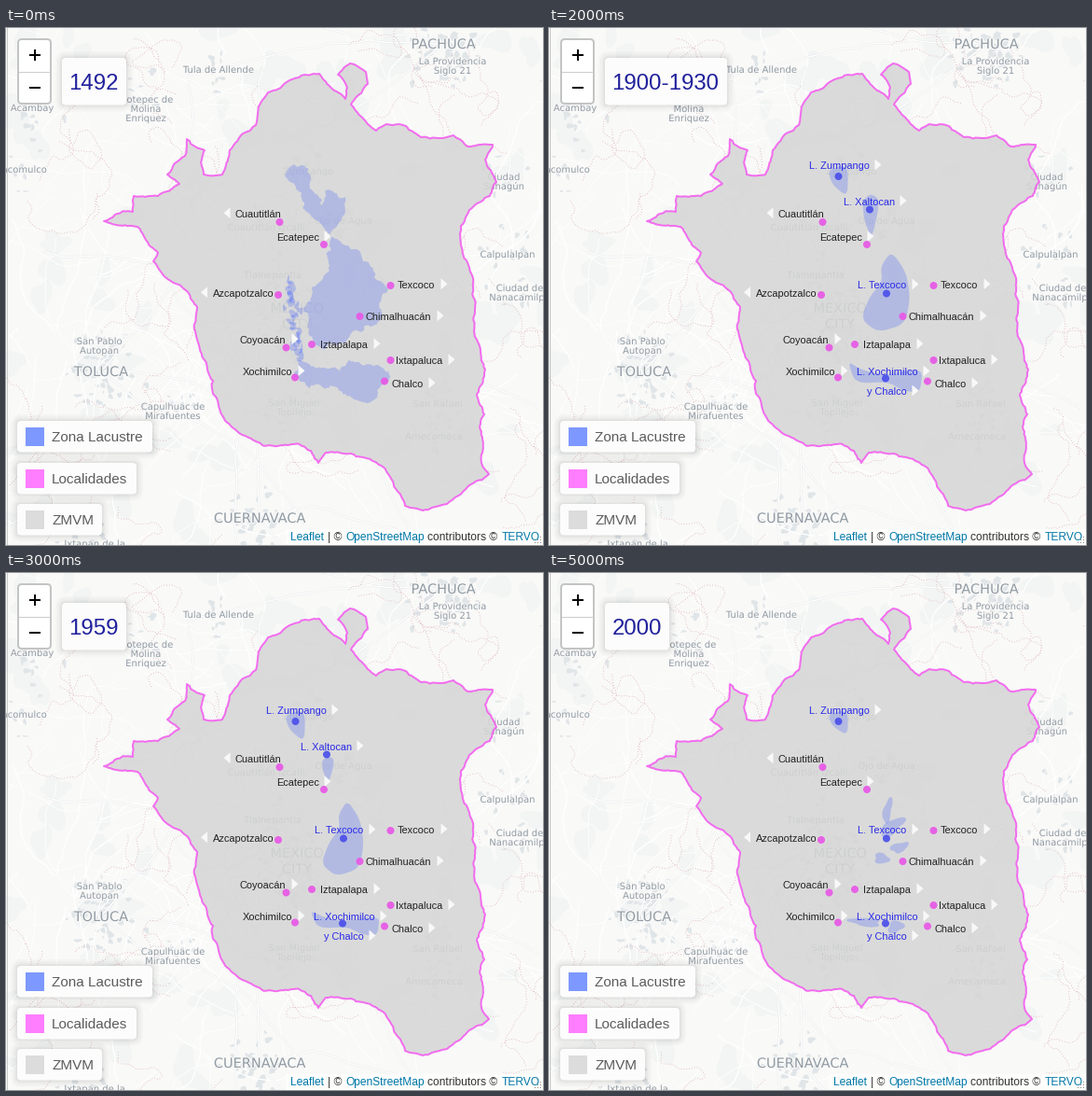
A matplotlib script that plays this animation: 576x554 px, repeating every 6000 ms.

```python
import math
import numpy as np
import matplotlib.pyplot as plt
from matplotlib.animation import FuncAnimation
from matplotlib.patches import Circle, FancyBboxPatch, Polygon, Rectangle
from matplotlib.patheffects import withStroke

W, H = 576, 554
SANS, MAP_FONT = "Liberation Sans", "DejaVu Sans"
PAPER = "#f9f9f8"
rng = np.random.default_rng(1521)

# dpi 72 makes one point equal one pixel
fig = plt.figure(figsize=(W / 72, H / 72), dpi=72, facecolor=PAPER)
ax = fig.add_axes([0, 0, 1, 1])
ax.set(xlim=(0, W), ylim=(H, 0))
ax.axis("off")


def text(x, y, s, size, color, z=8, font=SANS, **kw):
    return ax.text(x, y, s, fontsize=size, color=color, family=font,
                   va="baseline", zorder=z, **kw)


def shape(pts, color, z, alpha=1):
    return ax.add_patch(Polygon(pts, fc=color, ec="none", alpha=alpha, zorder=z))


def box(x0, y0, x1, y1, r=4, **kw):
    return ax.add_patch(FancyBboxPatch(
        (x0, y0), x1 - x0, y1 - y0,
        boxstyle=f"round,pad=0,rounding_size={r}", **kw))


def panel(x0, y0, x1, y1):
    """White card with a soft shadow."""
    parts = [box(x0 - g, y0 - g, x1 + g, y1 + g, 4 + g, fc="black", ec="none",
                 alpha=0.018, zorder=10) for g in (1, 2, 3, 5, 7)]
    parts.append(box(x0, y0, x1, y1, fc="#fcfcfc", ec="none", zorder=11))
    return parts


def fractal(pts, amp, step=4):
    """Closed outline roughened by repeated midpoint displacement."""
    def split(a, b):
        d = math.dist(a, b)
        if d < step:
            return [a]
        mid = (a + b) / 2 + rng.normal(0, amp * d, 2)
        return split(a, mid) + split(mid, b)

    p = np.array(pts, float)
    return np.array([q for a, b in zip(p, np.roll(p, -1, axis=0)) for q in split(a, b)])


def smooth(pts):
    """Closed outline with its corners cut three times."""
    p = np.array(pts, float)
    for _ in range(3):
        q = np.roll(p, -1, axis=0)
        p = np.stack([0.8 * p + 0.2 * q, 0.2 * p + 0.8 * q], 1).reshape(-1, 2)
    return p


def blob(x, y, rx, ry, tilt=0, wobble=0.18):
    t = np.linspace(0, 2 * np.pi, 24, endpoint=False)
    r = 1 + wobble * (np.sin(2 * t + rng.uniform(0, 6)) + np.sin(3 * t + rng.uniform(0, 6)))
    u, v = rx * r * np.cos(t), ry * r * np.sin(t)
    c, s = math.cos(tilt), math.sin(tilt)
    return np.c_[x + c * u - s * v, y + s * u + c * v]


def shrink(pts, anchor, sx, sy):
    return np.array(anchor) + (np.array(pts) - anchor) * (sx, sy)


def wander(x, y, n, step, turn):
    heading = rng.uniform(0, 2 * np.pi) + np.cumsum(rng.normal(0, turn, n))
    return x + np.cumsum(step * np.cos(heading)), y + np.cumsum(step * np.sin(heading))


def somewhere():
    return rng.uniform(0, W), rng.uniform(0, H)


# Base map: hills, towns, roads and dotted borders
cities = [(469, 22, "PACHUCA"), (102, 373, "TOLUCA"), (272, 530, "CUERNAVACA"),
          (312, 305, "MEXICO"), (312, 322, "CITY")]
towns = [(228, 48, "Tula de Allende"), (479, 39, "La Providencia\nSiglo 21"),
         (28, 89, "Acambay"), (150, 80, "Jilotepec de\nMolina\nEnriquez"),
         (13, 155, "Atlacomulco"), (534, 163, "Ciudad\nSahagún"),
         (538, 246, "Calpulalpan"), (551, 282, "Ciudad de\nNanacamilpa"),
         (100, 339, "San Pablo\nAutopan"), (179, 409, "Capulhuac de\nMirafuentes"),
         (95, 556, "Ixtapan de la"), (324, 157, "Zumpango"),
         (279, 217, "Cuautitlán Izcalli"), (362, 210, "Ojo de Agua"),
         (286, 268, "Tlalnepantla"), (309, 405, "San Miguel\nTopilejo"),
         (463, 406, "San Rafael"), (459, 441, "Amecameca")]

for _ in range(80):
    shape(blob(*somewhere(), *rng.uniform(6, 20, 2)), "#f2f5f4", 1)

for places, spread, count in [(cities, 18, 45), (towns, 14, 12)]:
    for x, y, _ in places:
        for _ in range(count):
            shape(blob(*rng.normal((x, y), spread), *rng.uniform(0.8, 4, 2)), "#e0e5e8", 1)

for _ in range(130):
    ax.plot(*wander(*somewhere(), 35, 4, 0.16), color="white",
            lw=rng.uniform(0.6, 1.5), zorder=1.2)
for x, y, _ in cities:
    for _ in range(3):
        road = wander(x, y - 5, 70, 4, 0.07)
        ax.plot(*road, color="#e6e8e9", lw=2.2, zorder=1.3)
        ax.plot(*road, color="white", lw=1.4, zorder=1.4)
for _ in range(75):
    ax.plot(*wander(*somewhere(), 45, 3, 0.4), color="#e2b9bb", lw=0.9,
            ls=(0, (1, 2.2)), zorder=1.5)

halo = [withStroke(linewidth=2, foreground=PAPER)]
for places, size in [(cities, 14.5), (towns, 10)]:
    for x, y, s in places:
        for k, line in enumerate(s.split("\n")):
            text(x, y + 10 * k, line, size, "#919ba4", 2, MAP_FONT, ha="center",
                 path_effects=halo)

# Metropolitan area, clockwise from its northern tip
border = [(369, 38), (386, 47), (388, 60), (370, 82), (388, 103), (397, 110), (408, 103),
          (432, 109), (445, 117), (467, 118), (480, 115), (496, 127), (522, 125),
          (514, 141), (526, 165), (519, 180), (497, 195), (488, 212), (488, 233),
          (501, 268), (502, 325), (514, 366), (505, 394), (513, 414), (510, 466),
          (518, 478), (497, 490), (465, 512), (447, 517), (428, 512), (404, 470),
          (370, 456), (343, 455), (335, 466), (275, 447), (250, 434), (222, 392),
          (203, 325), (205, 299), (185, 275), (158, 250), (163, 241), (141, 213),
          (105, 207), (136, 197), (137, 180), (163, 180), (186, 167), (173, 157),
          (192, 137), (194, 119), (213, 131), (212, 157), (232, 157), (240, 131),
          (268, 104), (281, 69), (336, 49), (352, 67), (364, 76), (366, 64), (356, 50)]
area = fractal(border, 0.06)
shape(area, "#d6d6d6", 3, 0.88)
ax.add_patch(Polygon(area, fc="none", ec="#f45cf0", lw=2, alpha=0.88,
                     joinstyle="round", zorder=5))

# Lakes: one rough body first, then separate lakes that shrink
ancient = [
    [(309, 146), (324, 150), (326, 172), (338, 190), (343, 174), (364, 181), (364, 196),
     (348, 222), (333, 206), (316, 180), (299, 158)],
    [(347, 222), (362, 232), (378, 238), (383, 250), (398, 270), (402, 312), (384, 320),
     (364, 338), (344, 343), (326, 330), (318, 300), (328, 278), (347, 260)],
    [(315, 355), (342, 364), (368, 356), (399, 361), (411, 378), (398, 396), (380, 400),
     (352, 384), (325, 386), (308, 374)]]
marsh = [blob(rng.normal(302 + 15 * t, 4), 270 + 85 * t, *rng.uniform(1.5, 5, 2))
         for t in np.linspace(0, 1, 32)]

zumpango = [(299, 153), (315, 147), (321, 153), (320, 181), (304, 168)]
xaltocan = [(330, 178), (343, 169), (358, 174), (358, 190), (346, 227), (332, 200)]
texcoco = [(368, 225), (386, 252), (391, 285), (385, 319), (352, 330), (331, 313),
           (341, 285), (357, 264), (355, 245)]
chalco = [(316, 353), (332, 364), (358, 371), (401, 361), (398, 393), (378, 390),
          (362, 379), (325, 381)]


def lakes(x_scale, t_scale, c_scale):
    return [smooth(p) for p in (zumpango, shrink(xaltocan, (346, 224), *x_scale),
                                shrink(texcoco, (361, 308), *t_scale),
                                shrink(chalco, (401, 380), *c_scale))]


remnants = [smooth(shrink(zumpango, (309, 148), 1, 0.8))] + [
    blob(*b) for b in [(363, 255, 5, 12, 0.15), (368, 272, 14, 7, -0.5),
                       (376, 294, 10, 5, -0.5), (357, 306, 9, 5, 0),
                       (339, 374, 19, 4, 0.05), (372, 379, 9, 6, 0)]]
periods = [("1492", [fractal(p, 0.13, 3) for p in ancient] + marsh),
           ("1824", lakes((1, 1), (1, 1), (1, 1))),
           ("1900-1930", lakes((0.6, 0.84), (0.88, 0.83), (0.95, 0.85))),
           ("1959", lakes((0.45, 0.5), (0.76, 0.78), (0.88, 0.7))),
           ("1980", remnants), ("2000", remnants)]


def marker(x, y, color):
    return ax.add_patch(Circle((x, y), 4, fc=color, ec="none", alpha=0.92, zorder=7))


def arrow(x, y, side=1):
    return shape([(x - 3.5 * side, y - 6), (x + 3.5 * side, y), (x - 3.5 * side, y + 6)],
                 "#f8f8f8", 6)


# name, text x, text middle y, dot, arrow x, arrow direction
for s, x, y, dot, tip, side in [
        ("Cuautitlán", 246, 199, (293.5, 208), 237, -1),
        ("Ecatepec", 290, 224, (341, 232), 345, 1),
        ("Azcapotzalco", 222, 284, (292, 286), 212.5, -1),
        ("Texcoco", 420, 275, (412.5, 276), 470, 1),
        ("Chimalhuacán", 386, 309, (379.5, 309), 466, 1),
        ("Coyoacán", 250.5, 334, (300.5, 342.5), 310, 1),
        ("Iztapalapa", 337.5, 339, (328, 339), 398, 1),
        ("Ixtapaluca", 418, 356, (412.5, 356), 478, 1),
        ("Xochimilco", 254, 368, (310, 374.5), 317, 1),
        ("Chalco", 413.5, 381, (406, 378.5), 457, 1)]:
    arrow(tip, y - 0.8, side)
    marker(*dot, "#e858e6")
    text(x, y + 4, s, 11, "#222222")


def lake_label(dot, *lines):
    parts = [marker(*dot, "#4b50ea")]
    for s, x, y, tip in lines:
        parts += [arrow(tip, y - 0.5), text(x, y + 4, s, 11, "#2a2ae8")]
    return parts


names = (lake_label((310.5, 159), ("L. Zumpango", 279, 147, 353))
         + lake_label((362, 284.5), ("L. Texcoco", 331, 275, 393))
         + lake_label((361, 375.5), ("L. Xochimilco", 330, 368, 405),
                      ("y Chalco", 341, 389, 393)))
xaltocan_name = lake_label((344, 194.5), ("L. Xaltocan", 315.5, 185.5, 380))

# Controls, legend and credits
box(13, 12, 48, 81, fc="white", ec="#c3c4c4", lw=2, zorder=12)
ax.plot([14, 47], [46.5, 46.5], color="#cccccc", lw=1, zorder=13)
for xs, ys in [((25, 37), (29, 29)), ((31, 31), (23, 35)), ((25, 37), (64, 64))]:
    ax.plot(xs, ys, color="black", lw=2, zorder=13, solid_capstyle="butt")

for s, top, right, color in [("Zona Lacustre", 421, 157, "#7d98ff"),
                             ("Localidades", 466, 140, "#ff7dff"),
                             ("ZMVM", 510, 103, "#dcdcdc")]:
    panel(12, top, right, top + 33.5)
    ax.add_patch(Rectangle((21, top + 6.5), 20, 20, fc=color, ec="none", zorder=12))
    text(49, top + 22, s, 15.3, "#5c5c5c", 12)

ax.add_patch(Rectangle((300, 537), 276, 17, fc="white", ec="none", alpha=0.7, zorder=10))
for x, s, color in [(305, "Leaflet", "#0078a8"), (345, "| ©", "#333333"),
                    (364, "OpenStreetMap", "#0078a8"),
                    (452.5, "contributors ©", "#333333"), (532, "TERVO", "#0078a8")]:
    text(x, 549, s, 12, color, 12)
for k in range(3):
    for j in range(k + 1):
        ax.add_patch(Rectangle((573 - 3 * j, 545 + 3 * k), 1.3, 1.3,
                               fc="#8a8a8a", ec="none", zorder=13))
ax.plot([0.5, 0.5], [0, H], color="#c9caca", lw=1, zorder=14)

# Everything that belongs to a single period
scenes = []
for year, bodies in periods:
    parts = [shape(p, "#5772f7", 4, 0.3) for p in bodies]
    parts += panel(60, 32, 191 if "-" in year else 129, 82.5)
    parts.append(text(67.5, 66, year, 24, "#20209c", 12))
    scenes.append(parts)


def show(parts, on):
    for p in parts:
        p.set_visible(on)


def update(i):
    for k, parts in enumerate(scenes):
        show(parts, k == i)
    show(names, i > 0)
    show(xaltocan_name, 1 <= i <= 3)
    return []


anim = FuncAnimation(fig, update, frames=len(periods), interval=1000,
                     init_func=lambda: update(0), repeat=True, repeat_delay=0)
plt.show()
```
